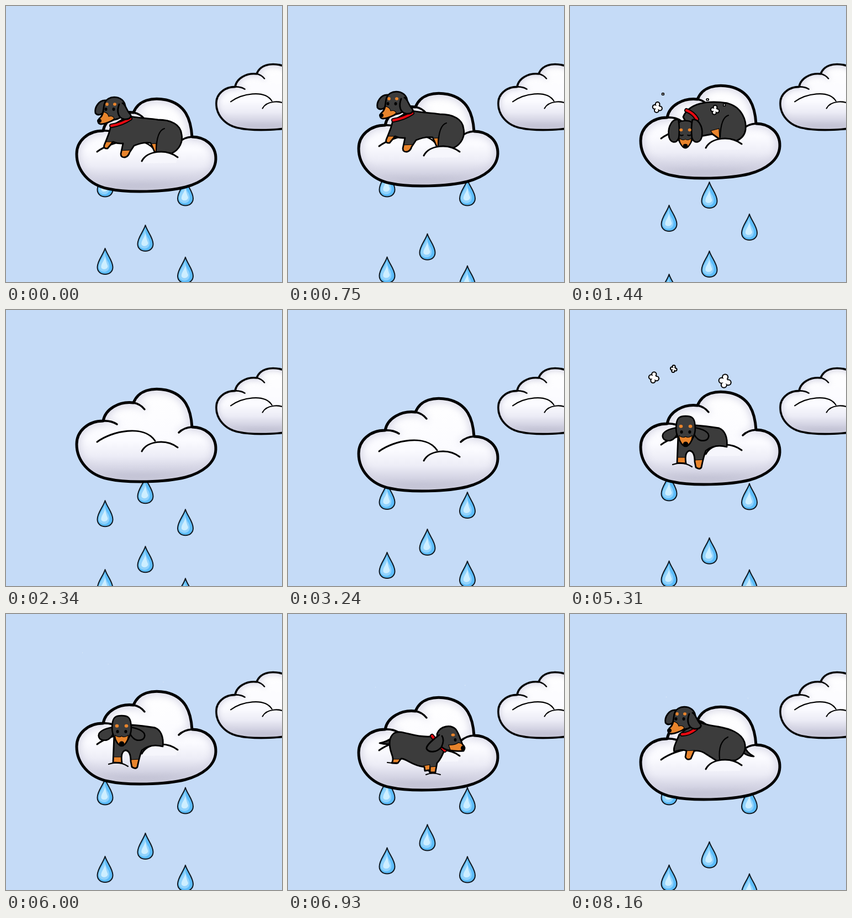
An HTML page with a canvas for the animation above (8190 ms loop, 500 by 500 pixels).

```html
<!DOCTYPE html>
<html>
<head>
<meta charset="utf-8">
<title>Cloud dog</title>
<style>
html, body { margin: 0; width: 100%; height: 100%; overflow: hidden; background: #c5dbf7; }
canvas { display: block; }
</style>
</head>
<body>
<canvas id="stage" width="500" height="500"></canvas>
<script>
const LOOP = 8190, TICK = 30;
const COAT = '#3c3c3c', TAN = '#e8842c', RED = '#e80a12';
const stage = document.getElementById('stage').getContext('2d');
let ctx = stage;

// ---- drawing helpers
function fill(d, color) {
  ctx.fillStyle = color;
  ctx.fill(new Path2D(d));
}
function line(d, width = 2.5, color = '#000') {
  ctx.strokeStyle = color;
  ctx.lineWidth = width;
  ctx.lineCap = ctx.lineJoin = 'round';
  ctx.stroke(new Path2D(d));
}
function shape(d, color = COAT, width = 2.8) {
  fill(d, color);
  line(d, width);
}
function dot(x, y, rx, ry = rx, color = '#000') {
  ctx.fillStyle = color;
  ctx.beginPath();
  ctx.ellipse(x, y, rx, ry, 0, 0, 7);
  ctx.fill();
}
function at(x, y, scale, draw) {
  ctx.save();
  ctx.translate(x, y);
  ctx.scale(scale, scale);
  draw();
  ctx.restore();
}
// coat shape with tan patches that stay inside it
function coat(d, ...patches) {
  fill(d, COAT);
  ctx.save();
  ctx.clip(new Path2D(d));
  patches.forEach(p => shape(p, TAN, 1.2));
  ctx.restore();
  line(d, 2.8);
}
function collar(d) {
  line(d, 8);
  line(d, 4.5, RED);
}

// ---- clouds
const OUTLINE = 'M176,226 C180,204 205,190 231,193 C240,170 265,165 290,170 C325,178 335,205 337,237 ' +
  'C360,237 381,252 380,278 C379,303 355,320 325,328 C290,337 220,339 185,331 C150,324 128,298 128,268 C128,245 148,226 176,226Z';
const CURLS = 'M176,226 Q190,225 201,232 M231,193 Q243,195 251,205 M337,237 Q322,238 313,247';
const RIDGE = 'M165,264 C192,244 250,232 270,262';
const BUMP = 'M246,281 C256,262 290,258 311,274';

function makeCloud() {
  const c = document.createElement('canvas');
  c.width = c.height = 500;
  ctx = c.getContext('2d');
  const g = ctx.createLinearGradient(0, 169, 0, 338);
  [[0, '#ffffff'], [.55, '#fbfbff'], [.72, '#ececf6'], [.86, '#d2d2e2'], [1, '#acacc0']]
    .forEach(s => g.addColorStop(...s));
  fill(OUTLINE, g);
  ctx.save();
  ctx.clip(new Path2D(OUTLINE));
  ctx.filter = 'blur(7px)';
  line(OUTLINE, 12, '#d4d4e4');
  line(CURLS, 7, '#dedeec');
  ctx.restore();
  line(OUTLINE, 5);
  line(CURLS, 3.5);
  ctx = stage;
  return c;
}
const cloud = makeCloud();

function bump() {
  fill(BUMP + ' L308,284 L250,285Z', '#f6f6fc');
  line(BUMP, 3);
}

// ---- dog
function sideHead() {
  shape('M181,171 C168,170 160,184 162,194 C166,200 175,196 180,190Z');
  coat('M177,184 C178,168 190,163 203,166 C215,170 219,181 214,193 C211,201 204,205 196,206 C189,209 180,214 172,214 ' +
    'C165,213 166,206 171,202 C176,197 176,191 177,184Z',
    'M175,192 Q184,192 186,200 Q194,198 196,204 L180,216 L164,214Z');
  shape('M205,178 C200,191 203,203 214,205 C225,206 229,200 224,195 C218,188 217,179 211,176');
  dot(169, 208, 4, 3.5);
  dot(181, 187, 2.5, 3);
  dot(195, 187, 2.5, 3);
  dot(183, 178, 2.8, 3, TAN);
  dot(197, 178, 3, 2.8, TAN);
}
function bothSides(d, width) {
  for (const side of [-1, 1]) {
    ctx.save();
    ctx.scale(side, 1);
    shape(d, COAT, width);
    ctx.restore();
  }
}
function frontHead(hanging) {
  if (!hanging) bothSides('M15,-8 C26,-6 45,-2 45,9 C44,20 29,20 23,14 Q17,9 16,2Z');
  coat('M-18,-14 C-17,-27 -11,-30 0,-30 C11,-30 17,-27 18,-14 C20,0 17,8 12,17 Q6,29 0,29 Q-6,29 -12,17 C-17,8 -20,0 -18,-14Z',
    'M-13,8 Q-6,14 0,10 Q6,14 13,8 L9,30 L-9,30Z');
  if (hanging) bothSides('M15,-32 C27,-36 38,-18 36,0 C36,18 18,22 14,6 Q12,-14 15,-32Z', 3.2);
  dot(0, 24, 5, 4);
  for (const x of [-8, 8]) {
    hanging ? line(`M${x - 3},1 q3,2 6,0`, 2.5) : dot(x, 1, 2.8, 3.2);
    dot(x * 1.15, -10, 3.6, 3.3, TAN);
  }
}
const THIGH = 'M287,222 Q273,226 272,262';

const poses = {
  resting() {
    coat('M190,218 C186,235 182,242 178,252 Q176,259 184,258 L194,246 Q203,250 212,249 L208,268 Q208,275 216,274 ' +
      'Q222,272 224,265 L232,253 Q248,246 262,248 L270,266 L300,267 C315,260 321,245 318,232 C316,215 300,206 275,206 C255,203 235,203 222,199Z',
      'M174,246 L192,246 L188,262 L174,262Z', 'M204,262 L226,261 L224,278 L204,278Z', 'M256,250 L272,249 L272,264 L262,262Z');
    line(THIGH, 2.2);
    collar('M191,217 Q210,214 225,204');
    sideHead();
    bump();
  },
  asleep() {
    coat('M205,225 C215,200 250,194 285,200 C312,207 320,232 318,248 Q316,262 302,268 L272,266 L258,256 L225,262Z',
      'M255,250 L270,246 L271,264 L262,262Z');
    line(THIGH, 2.2);
    collar('M211,213 Q224,218 230,229');
    at(209, 257, .84, () => frontHead(true));
    bump();
  },
  rising() {
    coat('M206,222 C198,235 198,250 199,252 Q212,242 226,249 Q240,243 252,248 Q268,255 272,266 Q290,262 308,270 ' +
      'C314,252 300,240 290,237 L255,227Z');
    collar('M209,219 L240,220');
    at(223.5, 205, 1, () => frontHead());
    line('M158,271 C175,255 190,247 200,250 Q212,241 226,249 Q240,242 252,248 Q265,255 270,266', 2.5);
    bump();
  },
  standing() {
    bump();
    coat('M196,245 L194,297 L210,298 Q207,278 216,275 Q226,275 226,295 L228,305 Q235,310 238,305 Q242,285 246,275 ' +
      'Q262,262 284,268 C286,250 280,238 270,234 Q245,230 228,229Z',
      'M190,287 L212,287 L212,300 L190,300Z', 'M224,292 L244,291 L240,310 L226,310Z');
    line('M186,300 Q205,293 221,304', 2.2);
    at(209.5, 240, .93, () => frontHead());
  },
  walking() {
    bump();
    ctx.translate(0, 19);
    shape('M189,222 Q178,230 166,232 Q178,235 188,233Z');
    coat('M192,214 C205,206 225,222 258,220 L285,240 Q278,260 270,268 L267,285 L257,285 L255,281 L248,282 L247,275 ' +
      'C225,273 215,260 205,260 L199,268 L188,268 Q192,262 188,252 C182,235 182,222 192,214Z',
      'M184,261 L202,261 L202,271 L184,271Z', 'M245,273 L257,271 L256,288 L245,288Z', 'M258,275 L270,274 L270,290 L258,290Z');
    line('M180,267 L197,269 M250,289 Q262,284 276,289', 2);
    collar('M261,219 Q272,234 284,245');
    coat('M270,215 C276,200 295,198 304,207 C310,215 312,225 316,234 Q323,240 318,246 Q305,247 292,245 C280,243 270,235 270,215Z',
      'M291,235 Q302,236 309,231 L324,236 L318,250 L296,250Z');
    shape('M274,217 C265,224 250,235 251,242 C255,250 270,249 278,239 Q284,226 279,219');
    dot(317, 241, 4, 4.5);
    dot(303, 226, 2.4, 3);
    dot(299, 217, 3.4, 2.6, TAN);
  },
  lounging() {
    shape('M314,236 Q320,252 333,258 Q322,258 312,250Z');
    coat('M198,218 C193,232 186,242 189,250 Q202,244 211,248 L209,259 Q212,266 219,262 L225,248 Q236,246 247,254 L266,266 ' +
      'L300,265 C315,258 320,245 316,232 C310,215 290,208 268,204 C255,202 240,200 230,194Z',
      'M206,248 L226,247 L222,266 L206,266Z');
    line('M286,223 Q268,232 271,263', 2.2);
    collar('M203,218 Q216,218 228,208');
    at(11, 3, 1, sideHead);
    bump();
  }
};

// first tick, pose, rain phase
const scenes = [
  [0, 'resting', 1], [30, 'asleep', 4], [58, '', 5], [143, 'rising', 3],
  [175, 'standing', 1], [210, 'walking', 1], [243, 'lounging', 2]
];

// ---- rain
const DROP = 'M0,1 C3,12 14,23 14,35 C14,43 8,48 0,48 C-8,48 -14,43 -14,35 C-14,23 -3,12 0,1Z';
function drop(x, y) {
  if (y < 225) return; // still inside the cloud
  at(x, y, 1, () => {
    fill(DROP, '#5dbcfb');
    fill('M-1,8 C-3,19 -12,25 -12,35 C-11,42 -4,45 2,43 C10,40 9,29 4,23 Q1,18 -1,8Z', '#92d3fd');
    fill('M0,16 C-2,25 -8,29 -7,36 C-4,41 5,39 5,33 Q2,27 0,16Z', '#cdeeff');
    line(DROP, 2, '#101820');
  });
}
function rain(tick, phase, hang) {
  const step = (tick + phase) % 8;
  for (let row = -1; row < 2; row++) {
    // a fresh drop clings to the cloud for a moment
    const y = 297.5 + 125 * row + 15.6 * (hang && row == 0 && step < 3 ? 0 : step);
    drop(179.5, y);
    drop(252.5, y - 42);
    drop(325, y + 16);
  }
}

// ---- puffs: start, life, from x y, to x y, size
const puffs = [
  [43, 25, 161, 192, 148, 150, 9], [43, 25, 168, 169, 170, 122, 3.5], [43, 25, 262, 198, 266, 150, 8],
  [43, 25, 250, 177, 246, 140, 3.5], [43, 25, 277, 188, 290, 145, 3.5],
  [143, 58, 192, 130, 185, 90, 9], [143, 58, 275, 137, 285, 123, 17], [143, 58, 172, 199, 138, 68, 14],
  [208, 24, 190, 195, 157, 130, 11], [208, 24, 270, 185, 323, 127, 13],
  [243, 31, 195, 185, 173, 148, 11], [243, 31, 285, 190, 325, 150, 13]
];
function puff(x, y, r) {
  const spread = r > 4 ? .55 : 0;
  for (const [grow, color] of [[1, '#000'], [-1, '#fff']]) {
    for (let i = 0; i < 4; i++) {
      const a = i * 1.45 + .4, k = r * spread * (1 + .15 * (i % 2));
      dot(x + Math.cos(a) * k, y + Math.sin(a) * k, Math.max(r * .44 + grow, .8), undefined, color);
    }
    if (spread) dot(x, y, r * .4, r * .4, color);
  }
}
function drawPuffs(tick) {
  for (const [start, life, x0, y0, x1, y1, size] of puffs) {
    const u = (tick - start) / life;
    if (u < 0 || u >= 1) continue;
    const x = x0 + (x1 - x0) * u, y = y0 + (y1 - y0) * u;
    const r = size * Math.sin(Math.PI * Math.sqrt(u));
    r < 2 ? dot(x, y, .8, .8, '#dce8f8') : puff(x, y, r);
  }
}

function frame() {
  const tick = Math.floor(performance.now() % LOOP / TICK);
  const [, pose, phase] = scenes.findLast(s => s[0] <= tick);
  const bob = Math.round(14 * Math.cos(2 * Math.PI * (tick + 3) / 136.5) - 13.7);

  ctx.fillStyle = '#c5dbf7';
  ctx.fillRect(0, 0, 500, 500);
  at(290, -14, .71, () => {
    ctx.drawImage(cloud, 0, 0);
    line(RIDGE, 3);
    line(BUMP, 3);
  });
  rain(tick, phase, pose);
  at(0, bob, 1, () => {
    ctx.drawImage(cloud, 0, 0);
    if (pose != 'rising') line(RIDGE, 3);
    pose ? poses[pose]() : line(BUMP, 3);
  });
  drawPuffs(tick);
  requestAnimationFrame(frame);
}
frame();
</script>
</body>
</html>
```
